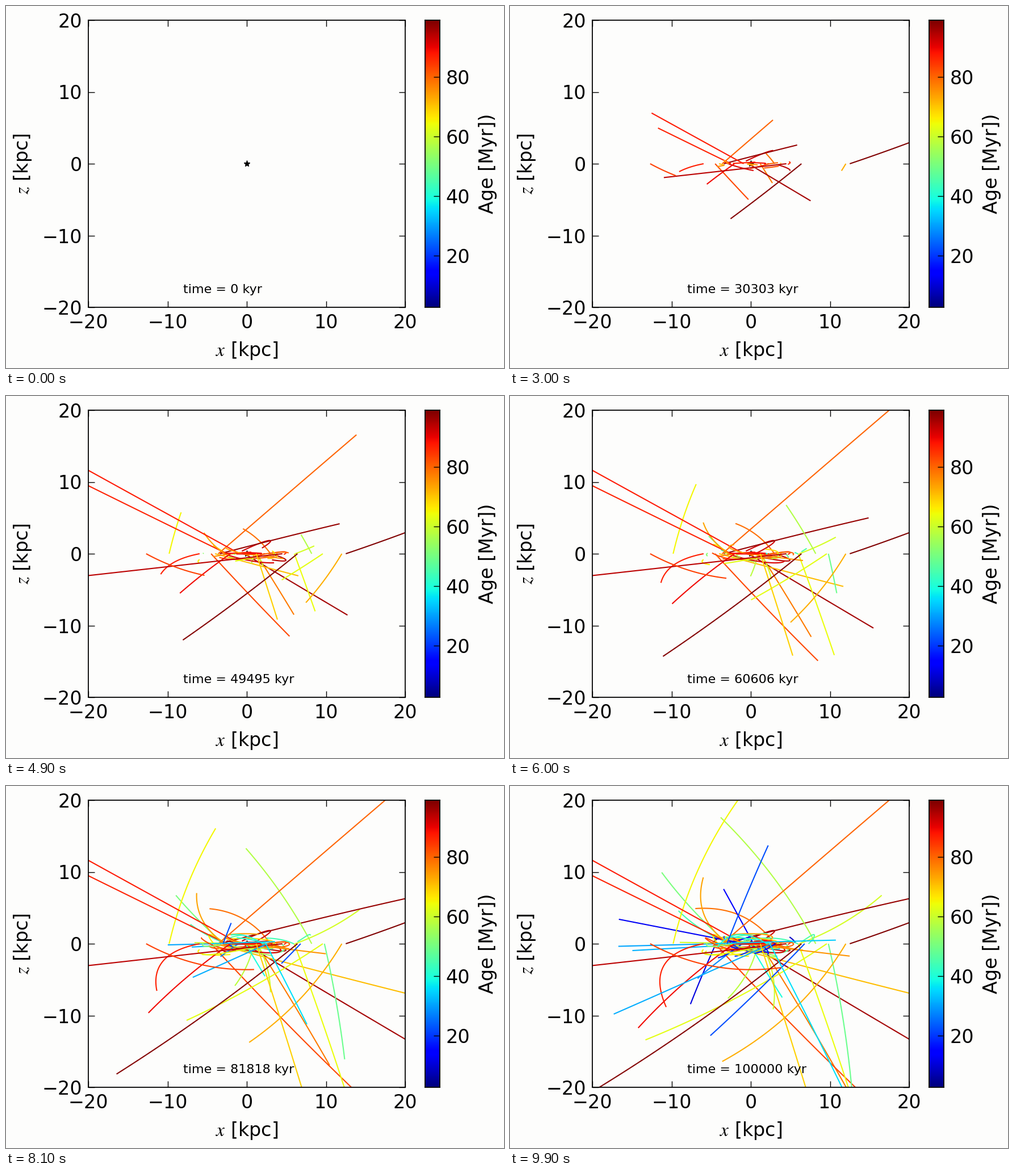
Write a matplotlib script that moves like this. It is 877 px wide and 638 px high and loops after 10000 ms.

```python
import numpy as np
import matplotlib.pyplot as plt
from matplotlib.animation import FuncAnimation
from matplotlib.collections import LineCollection
from matplotlib.colors import Normalize

W, H, DPI = 877, 638, 100
FRAMES, SPAN = 100, 100.0
BG = "#fdfdfc"

plt.rcParams.update({
    "font.family": "DejaVu Sans", "font.size": 24, "mathtext.fontset": "stix",
    "xtick.direction": "in", "ytick.direction": "in",
    "xtick.major.size": 8, "ytick.major.size": 8,
    "xtick.major.width": 1, "ytick.major.width": 1,
    "xtick.major.pad": 8, "ytick.major.pad": 8,
    "axes.linewidth": 1.3, "figure.facecolor": BG, "axes.facecolor": BG,
})

# The most striking stars: age in Myr, birth x in the disc, final x and z.
BRIGHT = [
    (99, 12.5, 39.4, 11.9), (98.5, 6.4, -20.6, -21), (97, -3.4, 24.6, 7.4),
    (96, -.3, 24, -15.9), (94, 4.5, -46, -6.2), (87.5, -.9, -48.5, 29),
    (87, -2.5, -41, 21), (84, -12.7, 4, -3.3), (83, -4.5, 18, -25),
    (80, -3.6, 37.4, 38.7), (79, 3, -7, 4.9), (78, 1.2, 12.5, -20.9),
    (72.5, 12, -3.6, -16.4), (71, -4, 27, -8.8), (69, 1.2, 9.4, -29),
    (65, -9.8, -1.3, 20.5), (64, 6, 15.7, -32), (63, 9.6, -13.3, -13.4),
    (57, 8.2, -3.8, 17.6), (49, 9.8, 13, -23.5), (36, 2.4, 11.6, -20.2),
    (31, 2.6, -17.3, -9.8), (22, -3, 2.2, 13.7), (22, 6.8, -5.1, -12.8),
]


def runaway(age, x0, x1, z1):
    """Slowing flight out of the disc, bent round the centre by gravity."""
    start, end = np.array([x0, 0]), np.array([x1, z1])
    step = end - start
    length = np.hypot(*step)
    side = np.array([-step[1], step[0]]) / length
    mid = (start + end) / 2
    sag = .007 * age ** 2 / length * (mid @ side) / np.hypot(*mid)

    def path(u):
        s = (u * (1.25 - .25 * u))[:, None]
        return start + s * step + 4 * s * (1 - s) * sag * side
    return age, path


def random_runaway(rng):
    age, x0 = rng.uniform(10, 90), rng.normal(0, 4.5)
    heading, reach = rng.uniform(0, 2 * np.pi), rng.uniform(7, 17)
    return runaway(age, x0, x0 + reach * np.cos(heading),
                   reach * np.sin(heading))


def bound(rng):
    """Slow orbit that stays near the disc."""
    age = rng.uniform(5, 97)
    a, b = rng.triangular(1, 3, 9), rng.uniform(.15, 1.8) * rng.choice([-1, 1])
    phase, turn = rng.uniform(0, 2 * np.pi), rng.choice([-1, 1]) * .19 / a
    bob, z0 = rng.uniform(.03, .09), rng.normal(0, .25)

    def path(u):
        return np.column_stack([a * np.cos(phase + turn * age * u),
                                z0 + b * np.sin(bob * age * u)])
    return age, path


rng = np.random.default_rng(7)
stars = [runaway(*star) for star in BRIGHT]
stars += [random_runaway(rng) for _ in range(18)]
stars += [bound(rng) for _ in range(38)]
rng.shuffle(stars)

fig = plt.figure(figsize=(W / DPI, H / DPI), dpi=DPI)


def box(left, top, right, bottom):
    return fig.add_axes([left / W, 1 - bottom / H,
                         (right - left) / W, (bottom - top) / H])


def label(x, y, text, angle=0):
    fig.text(x / W, 1 - y / H, text, rotation=angle, rotation_mode="anchor",
             ha="center", va="baseline")


ax = box(145, 25, 703, 531)
ax.set(xlim=(-20, 20), ylim=(-20, 20),
       xticks=range(-20, 21, 10), yticks=range(-20, 21, 10))
ax.tick_params(top=True, right=True)
ax.plot(0, 0, "k*", ms=8)

norm = Normalize(2.7, 99.1)
bar = box(737.5, 25, 763.5, 531)
bar.imshow(np.linspace(0, 1, 256)[:, None], cmap="jet", origin="lower",
           aspect="auto", extent=(0, 1, norm.vmin, norm.vmax))
bar.set(xticks=[], yticks=range(20, 81, 20))
bar.yaxis.tick_right()

label(424.5, 617, "$x$ [kpc]")
label(38.5, 278, "$z$ [kpc]", 90)
label(858, 278, "Age [Myr])", 90)

clock = ax.text(-8, -18, "", fontsize=16, zorder=3)
trails = LineCollection([], linewidths=1.5, zorder=2.2)
ax.add_collection(trails, autolim=False)


def draw(i):
    now = SPAN * i / (FRAMES - 1)
    born = [(age, path) for age, path in stars if SPAN - age < now]
    trails.set_segments([path(np.linspace(0, 1 - (SPAN - now) / age, 60))
                         for age, path in born])
    trails.set_color(plt.cm.jet(norm([age for age, _ in born])))
    clock.set_text(f"time = {now * 1000:.0f} kyr")
    return trails, clock


anim = FuncAnimation(fig, draw, frames=FRAMES, interval=100,
                     repeat=True, repeat_delay=0)
plt.show()
```
